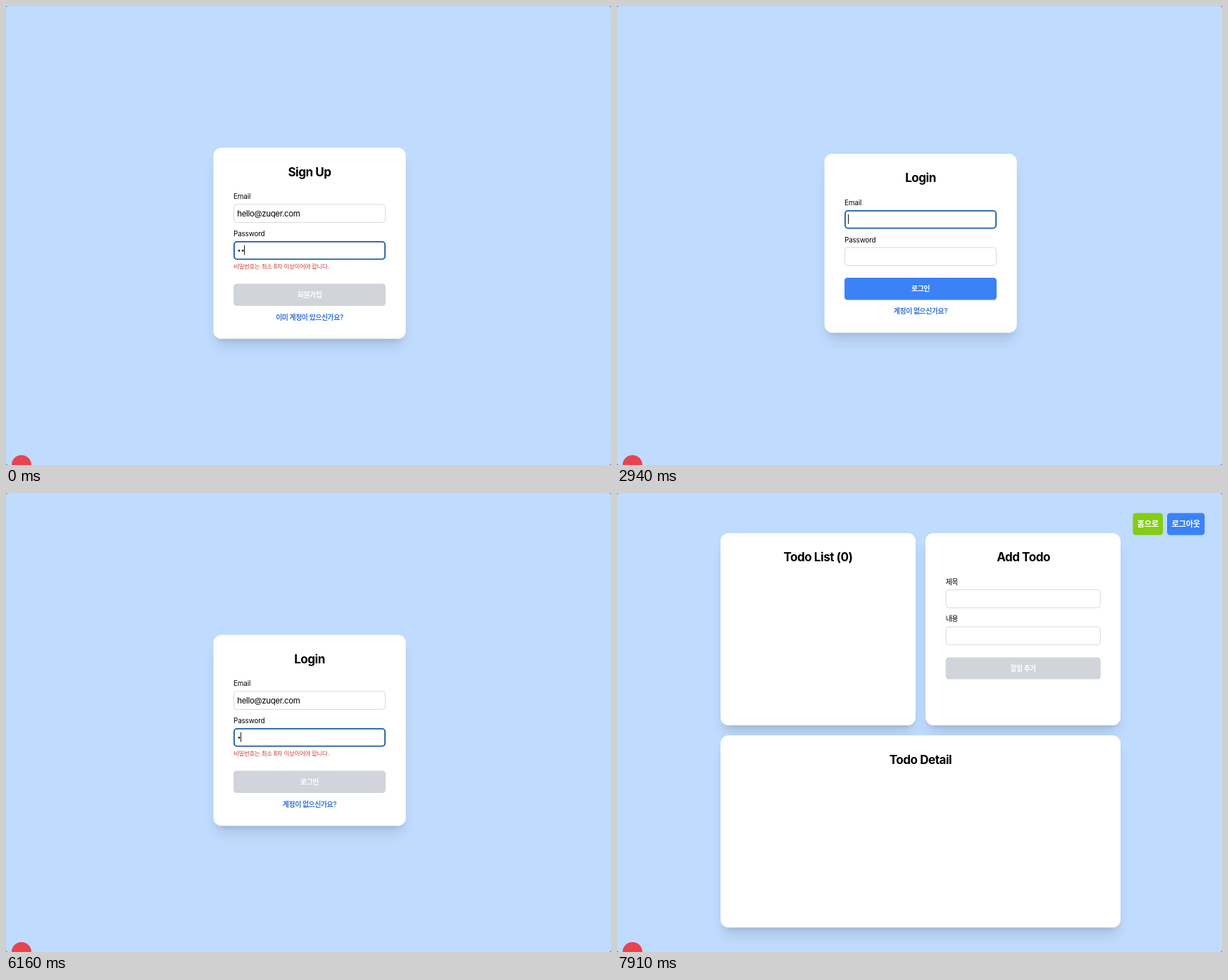
Animation, 859 px wide and 652 px high, one loop 8.33 s. Source, as an HTML page:

```html
<!DOCTYPE html>
<html lang="ko">
<head>
<meta charset="utf-8">
<title>Sign up and login</title>
<style>
  html, body { margin: 0; width: 100%; height: 100%; overflow: hidden; background: #bfdbfe; }
  svg { display: block; width: 859px; height: 652px; }
  text { font-family: Inter, "Noto Sans CJK KR", "Noto Sans CJK", sans-serif; white-space: pre; }
  .title { font-size: 17px; font-weight: 700; letter-spacing: -.45px; text-anchor: middle; }
  .label { font-size: 9.9px; letter-spacing: -.15px; }
  .ko { font-size: 9.9px; letter-spacing: -.4px; }
  .value { font-size: 11.4px; letter-spacing: -.3px; }
  .error { font-size: 8.5px; letter-spacing: -.3px; fill: #cf3f3a; }
  .button { font-size: 9.9px; font-weight: 700; letter-spacing: -.4px; text-anchor: middle; fill: #fff; }
  .link { font-size: 9.9px; font-weight: 600; letter-spacing: -.42px; text-anchor: middle; fill: #3575dc; }
  .nav { font-size: 11.4px; font-weight: 600; letter-spacing: -.4px; text-anchor: middle; fill: #fff; }
  .far { filter: blur(9px); }
  .near { filter: blur(3.5px); }
</style>
</head>
<body>
<svg viewBox="0 0 859 652" xmlns="http://www.w3.org/2000/svg">
  <rect width="859" height="652" fill="#bfdbfe"/>
  <path d="M0 0h2l-2 2zM859 0h-2l2 2zM0 652h2l-2-2zM859 652h-2l2-2z" fill="#60718c"/>
  <g id="view"></g>
  <circle cx="22" cy="652" r="14" fill="#e8434f"/>
</svg>
<script>
const LOOP = 8330;
const EMAIL = 'hello@zuqer.com';
const BLUE = '#3b82f6', GRAY = '#d1d5db', GREEN = '#84cc16';
const TEXT_X = 328.3, DOT_STEP = 5.13;

// Key press times in ms
const signUpKeys = [70, 350, 630, 840, 1050, 1260];
const emailKeys = [3850, 3990, 4130, 4270, 4410, 4690, 4830, 4970, 5040, 5180, 5250, 5390, 5530, 5670, 5670];
const loginKeys = [6160, 6230, 6370, 6510, 6790, 7000, 7210, 7490];

const view = document.getElementById('view');
const pressed = (keys, t) => keys.filter(k => k <= t).length;

const box = (x, y, w, h, r, fill, extra = '') =>
  `<rect x="${x}" y="${y}" width="${w}" height="${h}" rx="${r}" fill="${fill}" ${extra}/>`;
const text = (cls, x, y, str) => `<text class="${cls}" x="${x}" y="${y}">${str}</text>`;

function card(x, y, w, h) {
  const shade = (inset, drop, cls) =>
    box(x + inset, y + inset + drop, w - 2 * inset, h - 2 * inset, 9, '#000', `class="${cls}" opacity=".1"`);
  return shade(3.6, 14.2, 'far') + shade(4.3, 5.7, 'near') + box(x, y, w, h, 11.4, '#fff');
}

function field(x, y, w, focused) {
  const inset = focused ? .9 : .45;
  const stroke = focused ? 'stroke="#1a5aa6" stroke-width="1.8"' : `stroke="${GRAY}" stroke-width=".9"`;
  return box(x + inset, y + inset, w - 2 * inset, 26.5 - 2 * inset, 4, '#fff', stroke);
}

const button = (x, y, w, h, fill, label) =>
  box(x, y, w, h, 4.2, fill) + text('button', x + w / 2, y + h / 2 + 3.5, label);

function dots(n, y) {
  let out = '';
  for (let i = 0; i < n; i++)
    out += `<circle cx="${TEXT_X + 2.7 + i * DOT_STEP}" cy="${y}" r="1.35"/>`;
  return out;
}

function stateAt(t) {
  if (t >= 7840) return { page: 'todo' };
  if (t < 1890) return {
    page: 'signup', email: EMAIL, dots: 2 + pressed(signUpKeys, t),
    focus: 'password', caret: t < 1820, ready: t >= 1260
  };
  const sent = t >= 7770;
  return {
    page: 'login',
    email: sent ? '' : EMAIL.slice(0, pressed(emailKeys, t)),
    dots: sent ? 0 : pressed(loginKeys, t),
    focus: t >= 2730 && t < 5740 ? 'email' : 'password',
    caret: t >= 2310 && !(t >= 3150 && t < 3640),
    ready: t < 3850 || t >= 7490
  };
}

function drawForm(s) {
  const signUp = s.page === 'signup';
  const badEmail = s.email !== '' && !s.email.includes('.');
  const badPassword = s.dots > 0 && s.dots < 8;
  const extra = badEmail || badPassword ? 17.2 : 0;
  const top = 210 - extra / 2;
  const shift = badEmail ? extra : 0;
  const emailY = top + 80, passY = top + 132.6 + shift;
  const onEmail = s.focus === 'email';

  let out = card(294.5, top, 273.2, 254.2 + extra)
    + text('title', 431, top + 40.4, signUp ? 'Sign Up' : 'Login')
    + text('label', 323, top + 72.7, 'Email')
    + field(323, emailY, 216, onEmail)
    + `<text id="mail" class="value" x="${TEXT_X}" y="${emailY + 17.3}">${s.email}</text>`
    + text('label', 323, top + 125.5 + shift, 'Password')
    + field(323, passY, 216, !onEmail)
    + dots(s.dots, passY + 13.5)
    + button(323, top + 176 + extra, 216, 31.4, s.ready ? BLUE : GRAY, signUp ? '회원가입' : '로그인')
    + text('link', 431, top + 227.3 + extra, signUp ? '이미 계정이 있으신가요?' : '계정이 없으신가요?');
  if (badEmail) out += text('error', 323, top + 119.3, '이메일에는 @와 .이 포함되어야 합니다.');
  if (badPassword) out += text('error', 323, top + 172, '비밀번호는 최소 8자 이상이어야 합니다.');
  view.innerHTML = out;

  if (s.caret) {
    const width = onEmail ? document.getElementById('mail').getComputedTextLength() : s.dots * DOT_STEP;
    const y = Math.round((onEmail ? emailY : passY) + 6.4);
    view.insertAdjacentHTML('beforeend', box(Math.floor(TEXT_X + .2 + width), y, 1, 13.5, 0, '#111'));
  }
}

function drawTodo() {
  view.innerHTML = card(147, 57, 277, 273) + card(438, 57, 277, 273) + card(147, 344.3, 568, 273)
    + text('title', 285.5, 97.3, 'Todo List (0)')
    + text('title', 577, 97.3, 'Add Todo')
    + text('title', 431, 384.6, 'Todo Detail')
    + text('ko', 466.7, 130, '제목')
    + field(466.7, 137, 220, false)
    + text('ko', 466.7, 182.2, '내용')
    + field(466.7, 189.7, 220, false)
    + button(466.7, 233.6, 220, 31, GRAY, '할일 추가')
    + box(732.4, 28.4, 42.8, 31.4, 4.2, GREEN) + text('nav', 753.7, 48.2, '홈으로')
    + box(781, 28.4, 53.4, 31.4, 4.2, BLUE) + text('nav', 807.7, 48.2, '로그아웃');
}

let shown = '';
function render(t) {
  const s = stateAt(t), key = JSON.stringify(s);
  if (key === shown) return;
  shown = key;
  if (s.page === 'todo') drawTodo(); else drawForm(s);
}

const start = performance.now();
function tick(now) {
  render(Math.max(0, now - start) % LOOP);
  requestAnimationFrame(tick);
}
render(0);
requestAnimationFrame(tick);
</script>
</body>
</html>
```
